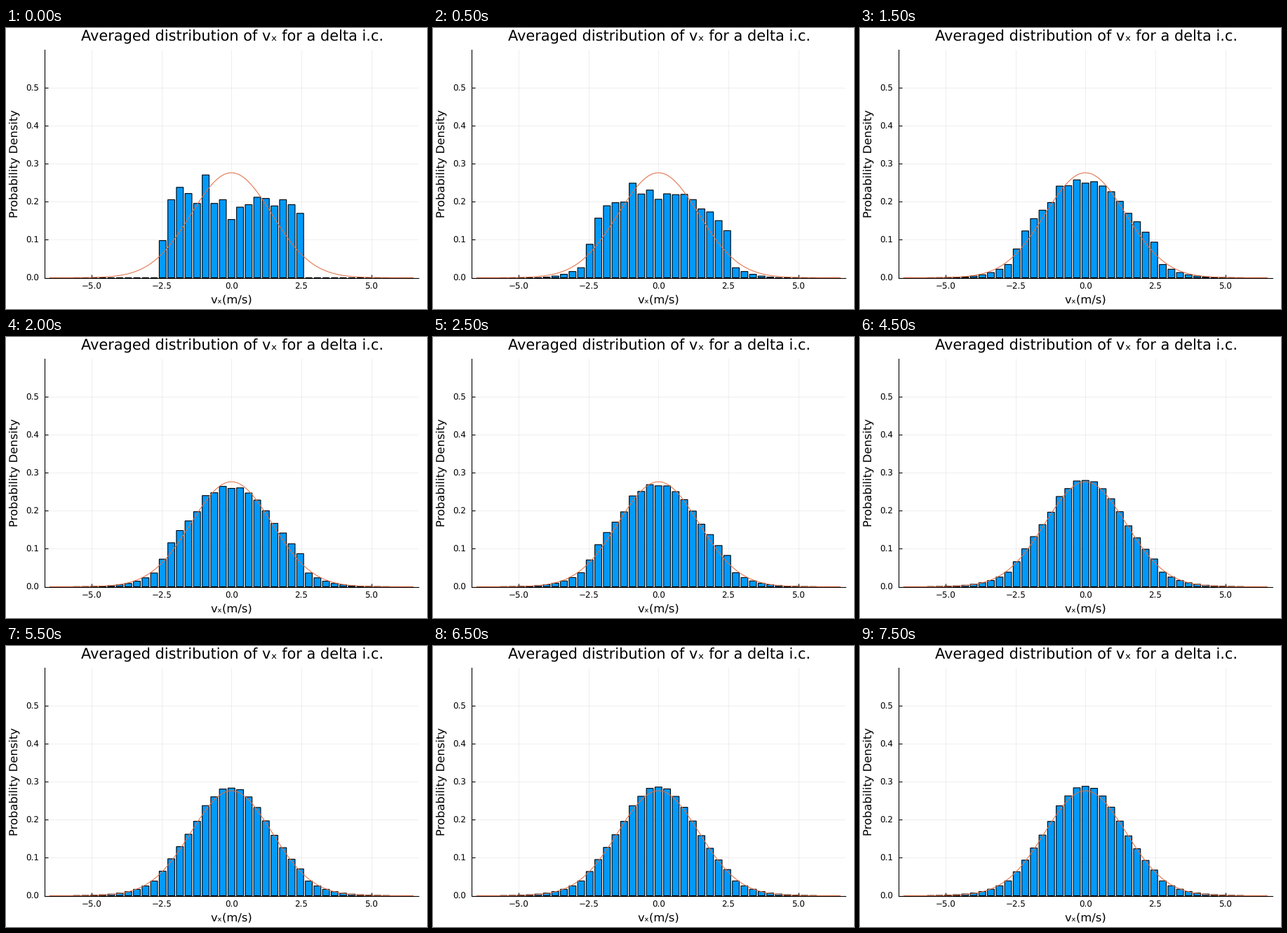
Animation, 600 px wide and 400 px high, one loop 8 s. Source, as a matplotlib script:

```python
import numpy as np
import matplotlib.pyplot as plt
from matplotlib.animation import FuncAnimation

W, H, DPI = 600, 400, 100
FRAMES, STEP_MS = 16, 500
LEFT, RIGHT, TOP, BOTTOM = 54.5, 588.1, 31.0, 355.5
X_MAX, Y_MAX = 6.695, 0.6
MID = (LEFT + RIGHT) / 2
UNIT = (RIGHT - LEFT) / (2 * X_MAX)     # pixels per m/s
BIN = 12.25 / UNIT
PEAK = 0.2763
SIGMA = 1 / (PEAK * np.sqrt(2 * np.pi))
EDGE = 18                               # bins on each side of zero

# Particle counts per bin of the first run; its speeds are still bounded
FIRST = [30, 63, 73, 68, 60, 83, 60, 63, 47, 57, 59, 65, 64, 58, 63, 59, 52]

centers = np.arange(-EDGE, EDGE + 1) * BIN
first = np.pad(FIRST, EDGE - len(FIRST) // 2) * 0.00326


def gauss(v):
    return PEAK * np.exp(-0.5 * (v / SIGMA) ** 2)


def settled(n):
    """Mean of the runs after the first: a bell whose kurtosis grows with n."""
    z2 = (centers / SIGMA) ** 2
    hermite = (z2 ** 2 - 6 * z2 + 3) / 24
    excess = 0.5 - 2.4 / (n + 1)
    return np.maximum(0, 1.03 * gauss(centers) * (1 + excess * hermite))


def heights(n):
    return (first + n * settled(n)) / (n + 1)


def px(pixels):
    return pixels * 72 / DPI


plt.rcParams.update({"font.family": "DejaVu Sans", "text.hinting": "no_hinting"})
fig = plt.figure(figsize=(W / DPI, H / DPI), dpi=DPI, facecolor="white")
ax = fig.add_axes([LEFT / W, 1 - BOTTOM / H, (RIGHT - LEFT) / W, (BOTTOM - TOP) / H])
ax.set(xlim=(-X_MAX, X_MAX), ylim=(0, Y_MAX))


def text(x, y, s, size, ha="center", **kw):
    fig.text(x / W, 1 - y / H, s, fontsize=px(size), ha=ha, va="baseline", **kw)


xticks = np.arange(-5, 5.1, 2.5)
yticks = np.arange(6) / 10
ax.set_xticks(xticks)
ax.set_yticks(yticks)
ax.set_axisbelow(True)
ax.grid(color="black", alpha=0.1, lw=px(0.6))
ax.tick_params(direction="in", length=px(5), width=px(1.1),
               labelbottom=False, labelleft=False)
for side, spine in ax.spines.items():
    spine.set(visible=side in ("left", "bottom"), linewidth=px(1.1), zorder=4)

for v in xticks:
    text(MID + v * UNIT, 371.5, f"{v:.1f}".replace("-", "\u2212"), 11.9)
for p in yticks:
    y = BOTTOM - p / Y_MAX * (BOTTOM - TOP)
    text(47.3, y + 4.4, f"{p:.1f}", 11.9, ha="right")

text(MID + 1.3, 18.8, "Averaged distribution of v\u2093 for a delta i.c.", 20.83)
text(MID, 392, "v\u2093(m/s)", 16.37)
text(16.3, 193.3, "Probability Density", 16.37, rotation=90, rotation_mode="anchor")

bars = ax.bar(centers, heights(0), width=0.8 * BIN, color="#009AFA",
              edgecolor="black", lw=px(1.1), zorder=2, clip_on=False, snap=False)
v = np.linspace(-6.5, 6.5, 300)
ax.plot(v, gauss(v), color="#E26F46", lw=px(1.05), zorder=3, clip_on=False)


def update(n):
    for bar, h in zip(bars, heights(n)):
        bar.set_height(h)
    return list(bars)


anim = FuncAnimation(fig, update, frames=FRAMES, interval=STEP_MS,
                     repeat=True, repeat_delay=0, blit=False)
plt.show()
```
